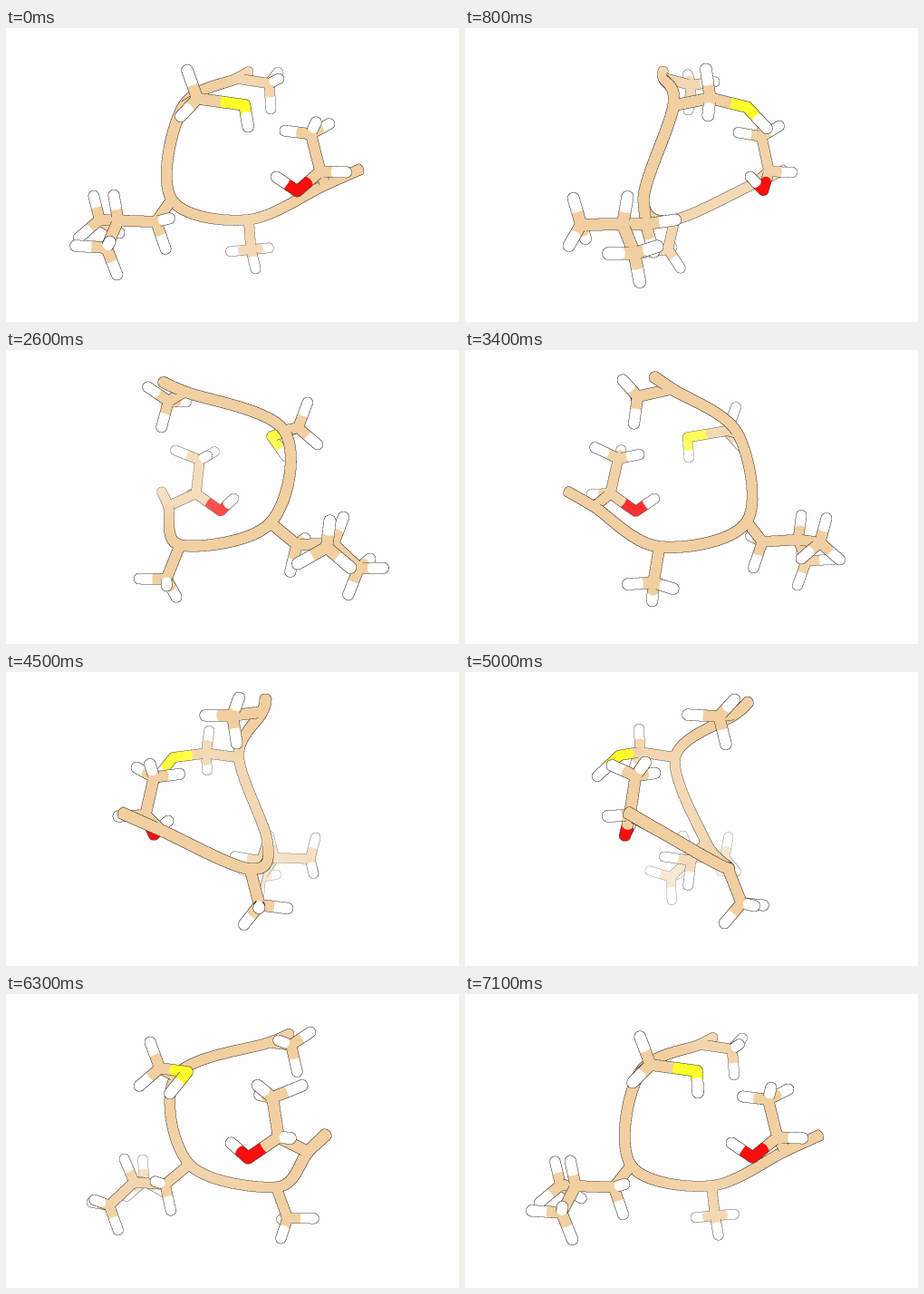
Write an HTML page with a canvas that moves like this. It is 500 px wide and 324 px high and loops after 7200 ms.

```html
<!DOCTYPE html>
<html lang="en">
<head>
<meta charset="utf-8">
<title>Rotating peptide</title>
<style>
html, body { margin: 0; width: 100%; height: 100%; overflow: hidden; background: #fefefe; }
canvas { display: block; width: 500px; height: 324px; }
</style>
</head>
<body>
<canvas id="stage" width="500" height="324"></canvas>
<script>
const W = 500, H = 324, SS = 2, BW = W * SS, BH = H * SS;
const CX = 247, CY = 160, CAMERA = 950;
const STICK = 5.6, TUBE = 5.7, JUMP = 7 * SS, FAR = -1e4;
const STEPS = 72, STEP_MS = 100;
const PAPER = 254;

const TAN = 0, WHITE = 1, YELLOW = 2, RED = 3;
const COLORS = [[241, 207, 161], [255, 255, 255], [255, 255, 40], [255, 13, 13]];
const LINE = [75, 70, 62];

// Molecule: each atom holds the atoms bonded beyond it
const atom = mat => (x, y, z, ...kids) => ({ p: [x, y, z], mat, kids });
const C = atom(TAN), h = atom(WHITE), S = atom(YELLOW), O = atom(RED);

const residues = [
  C(8, -110.5, -56,
    C(46, -104, -50, h(57, -119, -70), h(55, -106, -19), h(48, -75, -58))),
  C(-50, -70, 35,
    C(-33, -76, 73,
      h(-43, -104, 78), h(-49, -57, 88),
      S(15, -69, 77, h(18, -46, 103)))),
  C(-64, 29, 2,
    C(-79, 52, 26,
      h(-63, 47, 54), h(-69, 81, 26),
      C(-118, 50, 40,
        h(-121, 23, 52),
        C(-126, 76, 70, h(-157, 74, 72), h(-119, 68, 96), h(-116, 104, 65)),
        C(-143, 51, 4, h(-150, 25, 1), h(-164, 70, 15), h(-124, 67, -17))))),
  C(22, 54, -52,
    C(25, 90, -68, h(1, 94, -85), h(47, 90, -88), h(30, 111, -51))),
  C(106, 13, -7,
    C(97, -2, 28,
      h(123, -1, 40),
      C(87, -42, 26, h(60, -46, 16), h(90, -53, 51), h(109, -54, 6)),
      O(71, 19, 45, h(49, 4, 47))))
];

const rods = [];
function addBonds(a) {
  for (const b of a.kids) {
    rods.push({ a: a.p, b: b.p, r: STICK, ma: a.mat, mb: b.mat });
    addBonds(b);
  }
}
residues.forEach(addBonds);

// Backbone tube: a spline through the alpha carbons, with flat ends
function addTube(pts) {
  const n = pts.length - 1, per = 14, path = [];
  const slope = (i, k) => {
    const lo = Math.max(i - 1, 0), hi = Math.min(i + 1, n);
    return (pts[hi][k] - pts[lo][k]) / (hi - lo);
  };
  for (let j = 0; j <= n * per; j++) {
    const i = Math.min(Math.floor(j / per), n - 1), t = j / per - i;
    const t2 = t * t, t3 = t2 * t;
    path.push([0, 1, 2].map(k =>
      (2 * t3 - 3 * t2 + 1) * pts[i][k] + (t3 - 2 * t2 + t) * slope(i, k) +
      (3 * t2 - 2 * t3) * pts[i + 1][k] + (t3 - t2) * slope(i + 1, k)));
  }
  const last = path.length - 2;
  for (let j = 0; j <= last; j++) {
    rods.push({ a: path[j], b: path[j + 1], r: TUBE, ma: TAN, mb: TAN,
                flatA: j === 0, flatB: j === last });
  }
}
addTube([[23, -121, -75], ...residues.map(r => r.p), [143, -4.5, 10]]);

const depth = new Float32Array(BW * BH);
const mats = new Uint8Array(BW * BH);
const ctx = document.getElementById("stage").getContext("2d");
const image = ctx.createImageData(W, H);

function project([x, y, z], c, s) {
  const zr = z * c - x * s, k = CAMERA / (CAMERA - zr);
  return [(CX + (x * c + z * s) * k) * SS, (CY + y * k) * SS, zr * SS, k];
}

// Ray-cast one capsule into the depth buffer
function drawRod(rod, c, s) {
  const [ax, ay, az, ka] = project(rod.a, c, s);
  const [bx, by, bz, kb] = project(rod.b, c, s);
  const r = rod.r * SS * (ka + kb) / 2, rr = r * r;
  const dx = bx - ax, dy = by - ay, dz = bz - az;
  const len = dx * dx + dy * dy + dz * dz;
  const qa = Math.max(dx * dx + dy * dy, 1e-4);
  const x0 = Math.max(0, Math.floor(Math.min(ax, bx) - r));
  const x1 = Math.min(BW - 1, Math.ceil(Math.max(ax, bx) + r));
  const y0 = Math.max(0, Math.floor(Math.min(ay, by) - r));
  const y1 = Math.min(BH - 1, Math.ceil(Math.max(ay, by) + r));

  for (let y = y0; y <= y1; y++) {
    for (let x = x0; x <= x1; x++) {
      const ex = x + 0.5 - ax, ey = y + 0.5 - ay;
      const u = ex * dx + ey * dy, qb = u * dz;
      const qc = (ex * ex + ey * ey - rr) * len - u * u;
      const disc = qb * qb - qa * qc;
      if (disc < 0) continue;
      let w = (qb + Math.sqrt(disc)) / qa;
      const t = (u + w * dz) / len;
      if (t < 0 || t > 1) {
        const end = t > 1 ? 1 : 0;
        const fx = ex - end * dx, fy = ey - end * dy;
        const left = rr - fx * fx - fy * fy;
        if (left < 0) continue;
        if (end ? rod.flatB : rod.flatA) {
          if (end ? dz <= 0 : dz >= 0) continue;
          w = (end * len - u) / dz;
          const fz = w - end * dz;
          if (fz * fz > left) continue;
        } else {
          w = end * dz + Math.sqrt(left);
        }
      }
      const i = y * BW + x, z = az + w;
      if (z > depth[i]) {
        depth[i] = z;
        mats[i] = t < 0.5 ? rod.ma : rod.mb;
      }
    }
  }
}

const nearest = i => Math.max(
  depth[i - 1], depth[i + 1], depth[i - BW], depth[i + BW],
  depth[i - BW - 1], depth[i - BW + 1], depth[i + BW - 1], depth[i + BW + 1]);

function resolve() {
  const out = image.data, n = SS * SS;
  for (let y = 0; y < H; y++) {
    for (let x = 0; x < W; x++) {
      let r = 0, g = 0, b = 0;
      const border = !x || !y || x === W - 1 || y === H - 1;
      for (let k = 0; k < n; k++) {
        const i = (y * SS + (k >> 1)) * BW + x * SS + (k & 1);
        const front = border ? FAR : nearest(i);
        const edge = front > depth[i] + JUMP;
        const z = edge ? front : depth[i];
        if (z === FAR) {
          r += PAPER; g += PAPER; b += PAPER;
          continue;
        }
        const fog = Math.min(0.6, Math.max(0, (-20 - z / SS) / 220));
        const col = edge ? LINE : COLORS[mats[i]];
        r += col[0] + (255 - col[0]) * fog;
        g += col[1] + (255 - col[1]) * fog;
        b += col[2] + (255 - col[2]) * fog;
      }
      const o = (y * W + x) * 4;
      out[o] = r / n;
      out[o + 1] = g / n;
      out[o + 2] = b / n;
      out[o + 3] = 255;
    }
  }
  ctx.putImageData(image, 0, 0);
}

let shown = -1;
function render(ms) {
  const step = Math.floor(ms / STEP_MS) % STEPS;
  if (step === shown) return;
  shown = step;
  const angle = step / STEPS * 2 * Math.PI;
  const c = Math.cos(angle), s = Math.sin(angle);
  depth.fill(FAR);
  for (const rod of rods) drawRod(rod, c, s);
  resolve();
}

const start = performance.now();
function tick() {
  render(performance.now() - start);
  requestAnimationFrame(tick);
}
tick();
</script>
</body>
</html>
```
